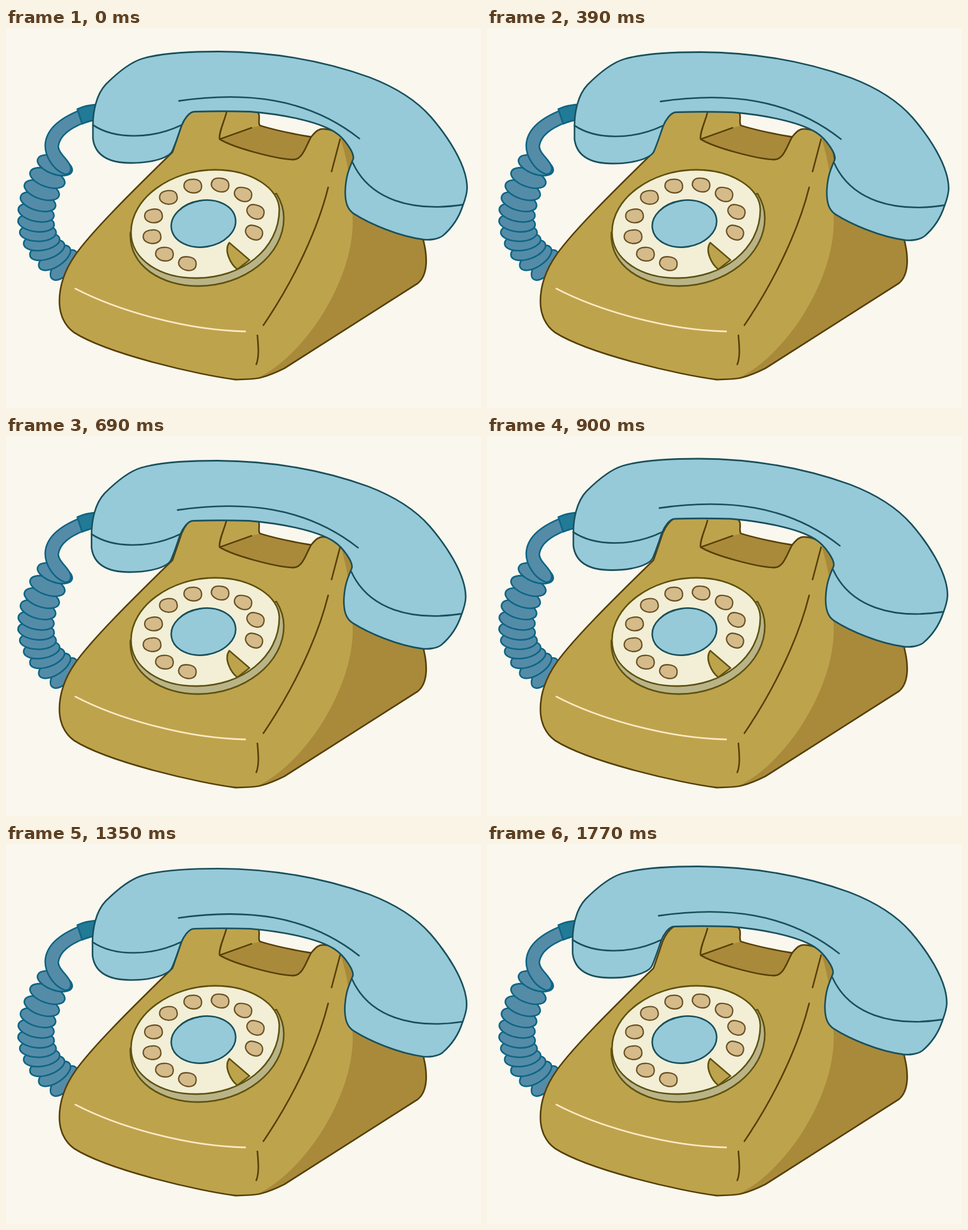
An HTML page for the animation above (1.8 s loop, 836 px wide and 670 px high).

```html
<!DOCTYPE html>
<html lang="en">
<head>
<meta charset="utf-8">
<title>Ringing telephone</title>
<style>
html, body { margin: 0; width: 100%; height: 100%; overflow: hidden; background: #faf7ee; }
svg { display: block; width: 100vw; height: 100vh; fill: none; stroke-width: 2.8; stroke-linecap: round; stroke-linejoin: round; }
.cord { stroke: #0e6585; fill: #548ca8; }
.base { stroke: #564009; }
.shade { stroke: none; fill: #a98a3a; }
.dial { stroke: #5f5210; }
.holes { stroke: #6b5226; fill: #d5bb8a; stroke-width: 2.4; }
.blue { stroke: #1a505c; }
</style>
</head>
<body>
<svg viewBox="0 0 836 670">
  <defs>
    <path id="body" d="M293 219C220 290 150 360 122 400C106 423 94 450 94 482C94 505 103 525 120 537C180 575 340 612 405 620C420 619 438 620 450 616C465 612 478 606 490 600L725 450C743 435 743 402 732 365L612 232C610 205 590 180 560 178C549 177 544 184 537 192C500 186 470 179 447 172C443 168 447 160 445 152C443 147 438 143 434 143H336C322 146 313 162 309 172C303 190 299 202 293 219Z"/>
  </defs>

  <g class="cord">
    <g id="coil"></g>
    <path d="M130 145C95 159 70 178 69 207C69 228 84 250 102 257C109 260 115 254 114 246C112 233 92 222 92 208C95 189 113 177 137 167Z"/>
    <path fill="#217a96" d="M125.500 143Q140 136 160 135L163 161Q148 163 134 169Z"/>
  </g>

  <g class="base">
    <use href="#body" fill="#bea34d" stroke="none"/>
    <path class="shade" d="M443 617C530 575 622 430 609 320C607 270 600 230 589 195C604 205 611 215 612 232L732 365C743 402 743 435 725 450L490 600C478 606 465 613 443 617Z"/>
    <path class="shade" d="M376 196L432 176L447 172C470 179 500 186 537 192C527 210 522 232 505 232C475 231 400 211 376 196Z"/>
    <use href="#body"/>
    <path d="M388 149C384 165 374 185 376 196L432 176M376 196C400 211 475 231 505 232C522 232 527 210 537 192"/>
    <path d="M588 196L573 253M567 281C550 350 510 440 453 524M442.500 542C444 560 446 580 440.500 593"/>
    <path stroke="#fbeac4" d="M122 459.500C200 500 320 533 421 535"/>
  </g>

  <g class="dial">
    <path fill="#b9b488" d="M219 360C215 420 275 455 338 455C420 455 489 400 489 335C489 320 484 305 476 292Z"/>
    <path fill="#f2efd6" d="M220 360C220 300 290 250 368 250C432 250 481 283 481 320C481 390 415 441 335 441C270 441 220 408 220 360Z"/>
    <g class="holes" id="holes"></g>
    <path fill="#bea34d" d="M393 378.500L428.500 409L407 425.500C395 416 383 392 393 378.500Z"/>
    <ellipse class="blue" fill="#96cad8" rx="57" ry="41" transform="translate(347.500 345) rotate(-9)"/>
  </g>

  <g class="blue" id="handset">
    <path fill="#96cad8" d="M153 171C153 150 158 118 176 99C195 80 217 61 240 54C270 45 320 41.500 374 41.500C470 42 560 58 640 87C692 107 727 133 748 157C773 186 812 240 811.500 283C811 295 807 305 804 313C796 338 783 354 769 366C760 373 745 374 735 373C690 367 640 345 613 328C600 320 597 306 597 288C598 262 603 250 611 231C614 222 597 195 578 183C548 164 485 152 430 147.500Q380 146 332 147.500C322 147.500 313 162 309 172C304 186 300 200 293 216C288 228 260 238 220 238C182 238 157 226 153 195Z"/>
    <path d="M153 171C190 196 255 197 309 171M610 237C640 303 715 325 804 311.500M304.500 128.500C420 112 530 122 622 195"/>
  </g>
</svg>
<script>
const byId = id => document.getElementById(id);
const repeat = (count, part) => Array.from({ length: count }, (_, i) => part(i)).join("");
const place = (x, y, turn) => `transform="translate(${x} ${y}) rotate(${turn})"`;

// Cord loops follow a bent line, drawn bottom to top
const bend = (a, b, c, u) => (1 - u) ** 2 * a + 2 * u * (1 - u) * b + u * u * c;
byId("coil").innerHTML = repeat(11, i => {
  const u = 1 - i / 10;
  return `<ellipse rx="32" ry="15.5"
    ${place(bend(86, 12, 102, u), bend(242, 357, 418, u), 20 - 70 * u ** 2.5)}/>`;
});

// Finger holes sit every 30 degrees on a circle seen at a slant
byId("holes").innerHTML = repeat(10, i => {
  const c = Math.cos(i * Math.PI / 6), s = Math.sin(i * Math.PI / 6);
  return `<path ${place(348 + 88.4 * c + 28.8 * s, 346 + 14.6 * c - 69.3 * s, 10 + 14 * c)}
    d="M-15.5 0C-15.5 -9 -8 -12 2 -12S15.5 -6 15.5 1S9 12 1 12S-15.5 7 -15.5 0Z"/>`;
});

// Handset shake: key poses as time, x, y
const LOOP = 1800, STEP = 30;
const poses = [
  [0, 0, 0], [390, 1, 1], [690, -2.4, 2], [900, -1, -1.5], [1140, 0, 1.4], [1530, -1.3, 2.1], [1770, -2.3, -2]
];
const handset = byId("handset");

function draw(now) {
  const t = Math.floor(now % LOOP / STEP) * STEP;
  const next = poses.findIndex(p => p[0] >= t) || 1;
  const [t0, x0, y0] = poses[next - 1], [t1, x1, y1] = poses[next];
  const u = (t - t0) / (t1 - t0), ease = u * u * (3 - 2 * u);
  handset.setAttribute("transform", `translate(${x0 + (x1 - x0) * ease} ${y0 + (y1 - y0) * ease})`);
  requestAnimationFrame(draw);
}
draw(performance.now());
</script>
</body>
</html>
```
